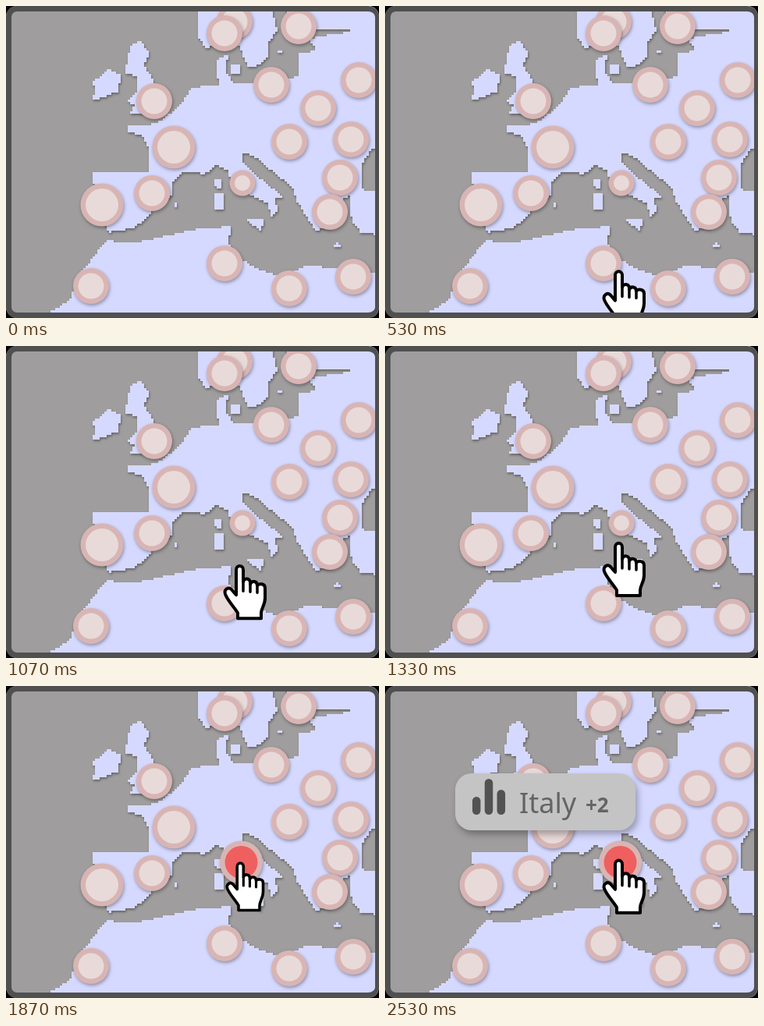
Recreate the animation shown at these times as an HTML page with a canvas. Size 478x400 px, loop 2790 ms.

```html
<!DOCTYPE html>
<html lang="en">
<head>
<meta charset="utf-8">
<title>Map marker tooltip</title>
<style>
  html, body { margin: 0; width: 100%; height: 100%; overflow: hidden; background: #000; }
  #stage { position: relative; width: 478px; height: 400px; overflow: hidden; border-radius: 14px; background: #9f9d9d; }
  canvas, svg { position: absolute; left: 0; top: 0; display: block; }
  canvas { filter: drop-shadow(1px 2px 1.5px rgba(0, 0, 0, .35)); }
  .marker { filter: drop-shadow(1px 2px 2px rgba(0, 0, 0, .35)); }
  #tip { filter: drop-shadow(3px 5px 4px rgba(0, 0, 0, .3)); }
  #frame { position: absolute; inset: 0; border: 7px solid #505050; border-right-width: 5.5px; border-radius: 14px; }
  text { font-family: "Noto Sans", "Open Sans", sans-serif; fill: #646464; }
</style>
</head>
<body>
<div id="stage">
  <canvas id="map" width="478" height="400"></canvas>
  <svg width="478" height="400" viewBox="0 0 478 400">
    <g id="markers"></g>
    <g id="tip" opacity="0">
      <rect x="90" y="112" width="231" height="73" rx="21" fill="#c4c4c4"/>
      <g id="bars" stroke="#525252" stroke-width="10.5" stroke-linecap="round"/>
      <text x="172" y="163" font-size="36">Italy</text>
      <text x="257" y="162" font-size="26" font-weight="600">+2</text>
    </g>
    <g id="hand" fill="#fff" stroke="#000" stroke-width="4" stroke-linejoin="round" stroke-linecap="round">
      <path d="M17 35V7C17 0 26 0 26 7V22C27 17 35 17 35 23V25C37 20 44 21 44 27C46 24 54 24 54 30V43C54 52 49 56 49 62V69H19V62C14 54 6 46 3 38C1 32 7 28 11 32L17 39Z"/>
      <path d="M26 22V34M35 25V35M44 28V36" fill="none" stroke-width="3.5"/>
    </g>
  </svg>
  <div id="frame" style="box-sizing:border-box"></div>
</div>
<script>
const $ = id => document.getElementById(id);

// Key points of each coast; the coarse grid below gives them their stepped edge.
const land = {
  europe: `M272 102L238 104 226 124 200 147 178 154 155 153 156 161 175 166 183 182 183 213
    110 213 113 230 106 274 128 281 132 290 165 284 186 266 187 256 212 243 214 224 228 212
    255 215 270 203 283 210 288 222 312 241 336 254 339 270 348 262 344 247 357 246 324 220
    303 198 303 189 316 191 369 234 372 250 397 287 418 284 416 258 440 243 443 275 455 291
    478 293V0H356L366 26 410 30 441 29V33L405 38 388 42 398 58 376 60 374 91 318 99 291 98
    282 84 284 62 270 69Z`,
  scandinavia: "M245 0L247 42 256 53 297 46 310 79 320 79 336 64 337 45 348 32 340 0Z",
  britain: "M160 50L172 45 184 60 177 75 190 98 212 118 204 136 158 138 166 127 153 123 167 112 167 90 152 86Z",
  ireland: "M130 81L148 88 143 110 108 122 116 108 110 97 122 90Z",
  africa: "M55 392L82 378 90 350 128 301 165 304 245 286 288 283 285 302 291 318 320 336 355 348 385 332 478 342V400H55Z",
  islands: "M306 274H330L327 288ZM268 222h9v11h-9ZM266 239h12v22h-12ZM215 253h5v4h-5ZM421 304h7v5h-7ZM289 75h12v13h-12ZM348 56h5v5h-5Z"
};
const blackSea = "M478 178L466 186 456 205 456 235 478 239Z";

function drawMap(cell = 3) {
  const w = Math.ceil(478 / cell), h = Math.ceil(400 / cell);
  const grid = Object.assign(document.createElement("canvas"), { width: w, height: h });
  const g = grid.getContext("2d");
  g.scale(1 / cell, 1 / cell);
  for (const d of Object.values(land)) g.fill(new Path2D(d));
  g.globalCompositeOperation = "destination-out";
  g.fill(new Path2D(blackSea));
  const rgba = g.getImageData(0, 0, w, h).data;
  const c = $("map").getContext("2d");
  c.fillStyle = "#d6d9ff";
  for (let i = 0; i < w * h; i++)
    if (rgba[i * 4 + 3] > 127) c.fillRect(i % w * cell, Math.floor(i / w) * cell, cell, cell);
}

function addMarker(x, y, r = 23, fill = "#e8dad9") {
  const group = document.createElementNS("http://www.w3.org/2000/svg", "g");
  group.setAttribute("class", "marker");
  group.innerHTML = `<circle cx="${x}" cy="${y}" r="${r}" fill="#d8b5b4"/>
    <circle cx="${x}" cy="${y}" r="${r - 6.5}" fill="${fill}"/>`;
  $("markers").append(group);
  return group;
}

drawMap();
const big = 27.5;
[[293, 20], [280, 35], [375, 26], [340, 101], [452, 95], [400, 131], [190, 122],
 [215, 181, big], [363, 174], [442, 171], [428, 220], [415, 264], [123, 255, big],
 [187, 240], [280, 330], [109, 359], [363, 362], [445, 347]].forEach(m => addMarker(...m));
const idle = addMarker(303, 227, 16.5);
const active = addMarker(301.5, 226, big, "#ef5f5f");
$("bars").innerHTML = [142, 119, 133]
  .map((top, i) => `<path d="M${117.2 + i * 15.8} ${top + 5.2}V159.8"/>`).join("");

const loop = 2790, tickLength = 400 / 3;
const arrive = 12, press = 14;

function render(time) {
  const tick = Math.floor((time + 4) / tickLength);
  const y = 397 - 14.6 * Math.min(tick, arrive);
  const scale = tick === press ? .9 : 1;
  const pressed = tick >= press;
  $("hand").setAttribute("transform", `translate(307 ${y + 36}) scale(${scale}) translate(-29 -36)`);
  idle.style.display = pressed ? "none" : "";
  active.style.display = pressed ? "" : "none";
  $("tip").setAttribute("opacity", Math.max(0, Math.min(1, (tick - 15.3) / 3.4)));
}

const start = performance.now();
function animate() {
  render((performance.now() - start) % loop);
  requestAnimationFrame(animate);
}
animate();
</script>
</body>
</html>
```
